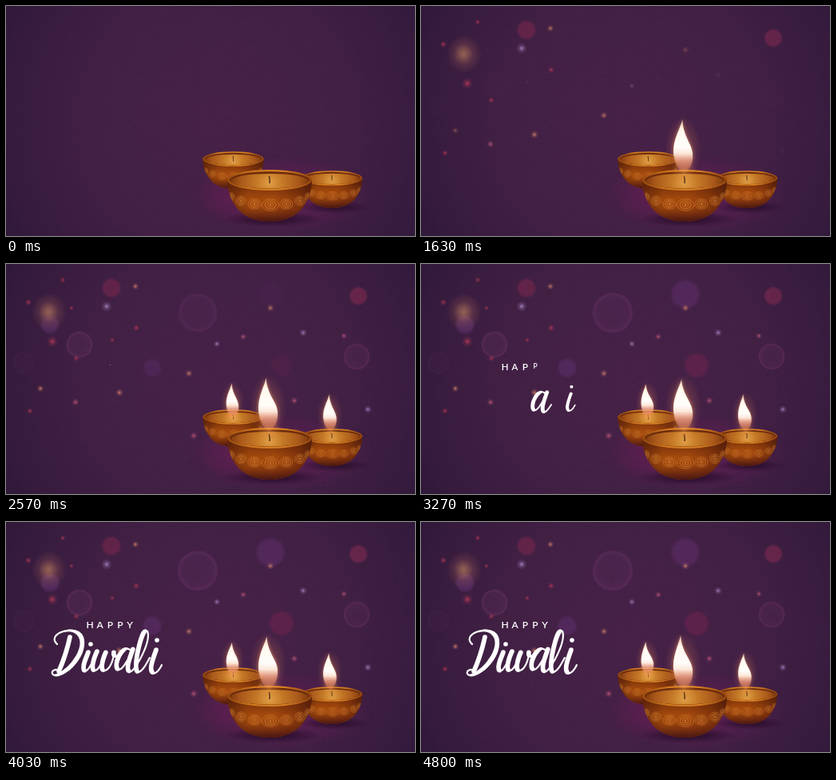
Write an HTML page with a canvas that moves like this. It is 512 px wide and 288 px high and loops after 4.83 s.

```html
<!DOCTYPE html>
<html lang="en">
<head>
<meta charset="utf-8">
<title>Happy Diwali</title>
<style>
  html, body { margin: 0; width: 100%; height: 100%; overflow: hidden; background: #321a3c; }
  canvas { display: block; width: 512px; height: 288px; }
</style>
</head>
<body>
<canvas id="stage" width="512" height="288" role="img" aria-label="Happy Diwali"></canvas>
<script>
const LOOP = 4830, W = 512, H = 288, TAU = Math.PI * 2;
const ctx = document.getElementById('stage').getContext('2d');

const clamp = v => Math.max(0, Math.min(1, v));
const progress = (t, start, dur) => clamp((t - start) / dur);
const easeOut = p => 1 - (1 - p) * (1 - p);
const smooth = p => p * p * (3 - 2 * p);
const rgba = (c, a) => `rgba(${c},${a})`;

function layer(paint) {
  const c = document.createElement('canvas');
  c.width = W;
  c.height = H;
  paint(c.getContext('2d'));
  return c;
}

function fillStops(gradient, stops) {
  stops.forEach(([at, color]) => gradient.addColorStop(at, color));
  return gradient;
}

function ellipse(g, x, y, rx, ry, fill) {
  g.beginPath();
  g.ellipse(x, y, rx, ry, 0, 0, TAU);
  g.fillStyle = fill;
  g.fill();
}

// Soft elliptical spot that fades to nothing at its edge
function glow(g, x, y, rx, ry, color, alpha) {
  g.save();
  g.translate(x, y);
  g.scale(rx, ry);
  const fill = fillStops(g.createRadialGradient(0, 0, 0, 0, 0, 1), [
    [0, rgba(color, alpha)], [0.5, rgba(color, alpha * 0.5)], [1, rgba(color, 0)]
  ]);
  ellipse(g, 0, 0, 1, 1, fill);
  g.restore();
}

/* ---------- backdrop ---------- */

const backdrop = layer(g => {
  g.fillStyle = fillStops(g.createRadialGradient(265, 145, 20, 265, 145, 310), [
    [0, '#472147'], [0.5, '#412044'], [0.85, '#361b3d'], [1, '#2e1838']
  ]);
  g.fillRect(0, 0, W, H);

  // faint paper grain
  let seed = 7;
  const rand = () => (seed = seed * 16807 % 2147483647) / 2147483647;
  for (let i = 0; i < 5000; i++) {
    g.fillStyle = rand() < 0.5 ? 'rgba(20,8,32,.06)' : 'rgba(140,90,140,.04)';
    g.fillRect(rand() * W, rand() * H, 1 + rand() * 4, 1);
  }
});

/* ---------- bowls ---------- */

function rosette(g, x, y, r, squash) {
  g.save();
  g.translate(x, y);
  g.scale(squash, 1);
  g.strokeStyle = 'rgba(218,132,52,.62)';
  [[1, 0.9], [0.66, 1.2], [0.36, 1]].forEach(([k, width]) => {
    g.lineWidth = width;
    g.beginPath();
    g.ellipse(0, 0, r * k, r * k * 0.7, 0, 0, TAU);
    g.stroke();
  });
  ellipse(g, 0, 0, 1.2, 1, 'rgba(224,145,58,.8)');
  g.restore();
}

function bowl(g, x, y, scale) {
  g.save();
  g.translate(x, y);
  g.scale(scale, scale);

  const body = new Path2D('M-53 0 C-52 28 -36 52 0 52 C36 52 52 28 53 0 Z');
  g.fillStyle = fillStops(g.createLinearGradient(-53, 0, 53, 0), [
    [0, '#6e2e0c'], [0.25, '#a94e0d'], [0.55, '#ac4e0e'], [0.8, '#8e3c0c'], [1, '#5e250c']
  ]);
  g.fill(body);
  g.fillStyle = fillStops(g.createLinearGradient(0, 8, 0, 52), [
    [0, 'rgba(80,26,8,.5)'], [0.35, 'rgba(90,30,8,.1)'], [0.6, 'rgba(80,22,12,.2)'], [1, 'rgba(56,13,20,.88)']
  ]);
  g.fill(body);

  g.save();
  g.clip(body);
  rosette(g, 1, 31, 10.5, 1);
  [-1, 1].forEach(side => {
    rosette(g, 1 + side * 20, 30, 9, 0.9);
    rosette(g, 1 + side * 37, 26, 8.5, 0.75);
    rosette(g, side * 48, 21, 7.5, 0.5);
  });
  g.restore();

  ellipse(g, 0, 0, 53, 13, fillStops(g.createLinearGradient(-53, 0, 53, 0), [
    [0, '#984a0e'], [0.3, '#d27a1e'], [0.65, '#d98224'], [1, '#96460e']
  ]));
  ellipse(g, 0, 0, 50, 10.7, '#6c2c0c');
  ellipse(g, 0, 1.2, 48.5, 9.3, fillStops(g.createRadialGradient(0, 4, 2, 0, 3, 48), [
    [0, '#dd9a42'], [0.3, '#c57a27'], [0.75, '#a9581a'], [1, '#853e0f']
  ]));

  g.strokeStyle = '#4a2412';
  g.lineWidth = 1.3;
  g.beginPath();
  g.moveTo(0, 4);
  g.quadraticCurveTo(0.6, 0, -0.6, -5);
  g.stroke();
  g.restore();
}

const bowls = layer(g => {
  glow(g, 350, 236, 112, 50, '140,28,105', 0.45);
  glow(g, 290, 238, 62, 40, '125,28,88', 0.3);
  glow(g, 412, 252, 44, 8, '25,6,30', 0.7);
  glow(g, 334, 267, 62, 10, '25,6,30', 0.8);
  bowl(g, 284.5, 191.5, 0.72);
  bowl(g, 408, 215.5, 0.72);
  bowl(g, 330, 218, 1);
});

/* ---------- floating lights ---------- */

// x, y, radius, colour, extra delay
const RED = '180,56,86', PINK = '190,88,120', AMBER = '206,128,104', LILAC = '160,128,188';
const dots = [
  [71, 20, 2.2, RED], [162, 28, 2.6, AMBER], [28, 48, 2.6, RED], [126, 53, 4, LILAC],
  [82, 55, 1.8, RED, 900], [58, 97, 4.2, RED], [163, 80, 2.6, RED], [133, 95, 2, RED, 700],
  [88, 118, 2.4, RED, 250], [142, 161, 3, AMBER, -200], [43, 156, 2.7, AMBER, 800],
  [87, 173, 2.8, PINK, 300], [30, 184, 2.4, RED, 200], [229, 137, 2.8, AMBER],
  [264, 100, 2.6, LILAC, 200], [297, 91, 2.5, PINK, 300], [331, 55, 2.8, AMBER],
  [372, 86, 3, LILAC], [423, 90, 2.4, PINK], [453, 182, 3, LILAC, -200],
  [361, 171, 2.8, PINK, 300], [235, 215, 3, PINK, 700]
];

// x, y, radius, colour, start, strength
const discs = [
  [132, 30, 13, '150,42,80', 700, 0.4], [441, 40, 12.5, '158,46,86', 850, 0.43],
  [331, 38, 20, '108,52,124', 2300, 0.38], [183, 130, 13, '108,54,130', 2000, 0.36],
  [345, 127, 17, '130,36,82', 2200, 0.4], [55, 76, 13, '118,62,138', 1900, 0.36]
];
const rings = [
  [240, 61, 26, '118,58,114', 1700, 0.34], [92, 101, 17, '132,62,116', 1350, 0.34],
  [439, 116, 17, '128,58,104', 1350, 0.34], [22, 124, 14, '105,52,108', 1100, 0.13]
];

// Round light whose brightness runs from centre to rim
function orb(x, y, r, color, p, stops) {
  const R = r * (0.85 + 0.15 * p);
  ellipse(ctx, x, y, R, R, fillStops(ctx.createRadialGradient(x, y, 0, x, y, R),
    stops.map(([at, a]) => [at, rgba(color, a * p)])));
}

function drawLights(t) {
  discs.forEach(([x, y, r, color, start, k]) =>
    orb(x, y, r, color, smooth(progress(t, start, 900)), [[0, k * 0.95], [0.72, k], [1, 0]]));
  rings.forEach(([x, y, r, color, start, k]) =>
    orb(x, y, r, color, smooth(progress(t, start, 1300)), [[0, k * 0.3], [0.75, k * 0.45], [0.91, k], [1, 0]]));

  const warm = smooth(progress(t, 550, 1000));
  glow(ctx, 54, 60, 22, 24, '196,116,92', 0.42 * warm);
  glow(ctx, 53, 60, 12, 13, '206,152,98', 0.36 * warm);

  dots.forEach(([x, y, r, color, delay = 0]) => {
    const p = smooth(progress(t, 350 + x * 3 + delay, 700));
    glow(ctx, x, y, r * 1.7, r * 1.7, color, 0.55 * p);
    ellipse(ctx, x, y, r * 0.55, r * 0.55, rgba(color, 0.5 * p));
  });
}

/* ---------- flames ---------- */

const flames = [
  { x: 284, y: 193, size: 0.64, start: 1750, phase: 1 },
  { x: 406, y: 210, size: 0.69, start: 1850, phase: 2.4 },
  { x: 329, y: 210, size: 1, start: 970, phase: 0 }
];

function drawFlame({ x, y, size, start, phase }, t) {
  const p = easeOut(progress(t, start, 650));
  if (!p) return;
  const sway = Math.sin(t / 210 + phase) * 1.2;
  const tip = -67 + Math.sin(t / 160 + phase) * 1.3;
  const s = size * p;

  glow(ctx, x - s, y - 30 * s, 23 * s, 42 * s, '240,140,85', 0.36);
  glow(ctx, x, y - 4 * s, 16 * s, 12 * s, '255,170,80', 0.3);

  ctx.save();
  ctx.translate(x, y);
  ctx.scale(s, s);
  ctx.beginPath();
  ctx.moveTo(-3 + sway, tip);
  ctx.bezierCurveTo(-6 + sway, -54, -16, -40, -12, -20);
  ctx.bezierCurveTo(-10, -9, -5, -4, 0, 0);
  ctx.bezierCurveTo(7, -4, 12, -13, 11, -25);
  ctx.bezierCurveTo(10, -38, -2 + sway, -46, -3 + sway, tip);
  ctx.fillStyle = fillStops(ctx.createLinearGradient(0, 0, 0, -67), [
    [0, 'rgba(255,165,80,.1)'], [0.12, 'rgba(235,130,95,.4)'], [0.24, 'rgba(240,165,140,.65)'],
    [0.38, 'rgba(255,238,226,.95)'], [0.5, '#fffdfa'], [0.8, '#fff8ee'], [1, 'rgba(255,222,190,.85)']
  ]);
  ctx.shadowColor = 'rgba(255,165,105,.7)';
  ctx.shadowBlur = 4 * s;
  ctx.fill();
  ctx.restore();
}

/* ---------- lettering ---------- */

const caps = [['H', 105, 2650], ['A', 117.5, 2650], ['P', 130.5, 2500], ['P', 143, 2900], ['Y', 155, 3270]];

// Brush strokes: downward motion is thick, upward motion is thin
function brush(d, dot) {
  const path = document.createElementNS('http://www.w3.org/2000/svg', 'path');
  path.setAttribute('d', d);
  const shape = new Path2D(), length = path.getTotalLength();
  const stamp = (x, y, r) => {
    shape.moveTo(x + r, y);
    shape.arc(x, y, r, 0, TAU);
  };
  for (let s = 0; s <= length; s += 0.4) {
    const a = path.getPointAtLength(Math.max(0, s - 2));
    const b = path.getPointAtLength(Math.min(length, s + 2));
    const here = path.getPointAtLength(s);
    const down = (b.y - a.y) / (Math.hypot(b.x - a.x, b.y - a.y) || 1);
    stamp(here.x, here.y, 1.15 + 1.7 * smooth(clamp(down * 0.8 + 0.2)));
  }
  if (dot) stamp(dot[0], dot[1], 2.8);
  return shape;
}

const script = [
  { x: 76, y: 166, start: 3290, shape: brush('M64 153 C55 145 66 136 80 136 C100 137 98 158 88 172 C80 184 68 192 61 192 C56 191 57 185 63 185') },
  { x: 74, y: 166, start: 3290, shape: brush('M80 144 C77 158 72 174 66 187') },
  { x: 102, y: 172, start: 3380, shape: brush('M103 163 C100 171 95 181 98 186 C101 189 106 180 109 174', [106, 153]) },
  { x: 122, y: 174, start: 3330, shape: brush('M114 162 C109 172 106 186 111 186 C117 186 121 172 125 163 C120 174 118 186 123 186 C130 186 135 172 135 163 C134 168 137 169 141 167') },
  { x: 150, y: 171, start: 2850, shape: brush('M156 161 C150 154 142 164 139 174 C136 187 143 188 149 178 C153 172 156 166 159 159 C155 170 150 183 154 187 C157 189 161 183 165 177') },
  { x: 169, y: 164, start: 3350, shape: brush('M163 180 C171 168 181 146 177 137 C172 132 167 152 164 167 C162 180 162 191 168 187 C173 184 177 175 180 170') },
  { x: 187, y: 169, start: 2960, shape: brush('M188 160 C185 169 179 183 183 188 C186 192 192 186 195 179', [189, 148]) }
];

function scaledAt(x, y, s, paint) {
  if (s <= 0) return;
  ctx.save();
  ctx.translate(x, y);
  ctx.scale(s, s);
  ctx.translate(-x, -y);
  paint();
  ctx.restore();
}

function drawText(t) {
  ctx.fillStyle = '#fff';
  ctx.font = '600 12px Lato, sans-serif';
  ctx.textAlign = 'center';
  caps.forEach(([ch, x, start]) =>
    scaledAt(x, 126, easeOut(progress(t, start, 800)), () => ctx.fillText(ch, x, 133)));
  script.forEach(({ x, y, start, shape }) =>
    scaledAt(x, y, easeOut(progress(t, start, 650)), () => ctx.fill(shape)));
}

/* ---------- loop ---------- */

const began = performance.now();

function draw() {
  const t = (performance.now() - began) % LOOP;
  ctx.drawImage(backdrop, 0, 0);
  drawLights(t);
  ctx.drawImage(bowls, 0, 0);
  flames.forEach(f => drawFlame(f, t));
  drawText(t);
  requestAnimationFrame(draw);
}
draw();
</script>
</body>
</html>
```
